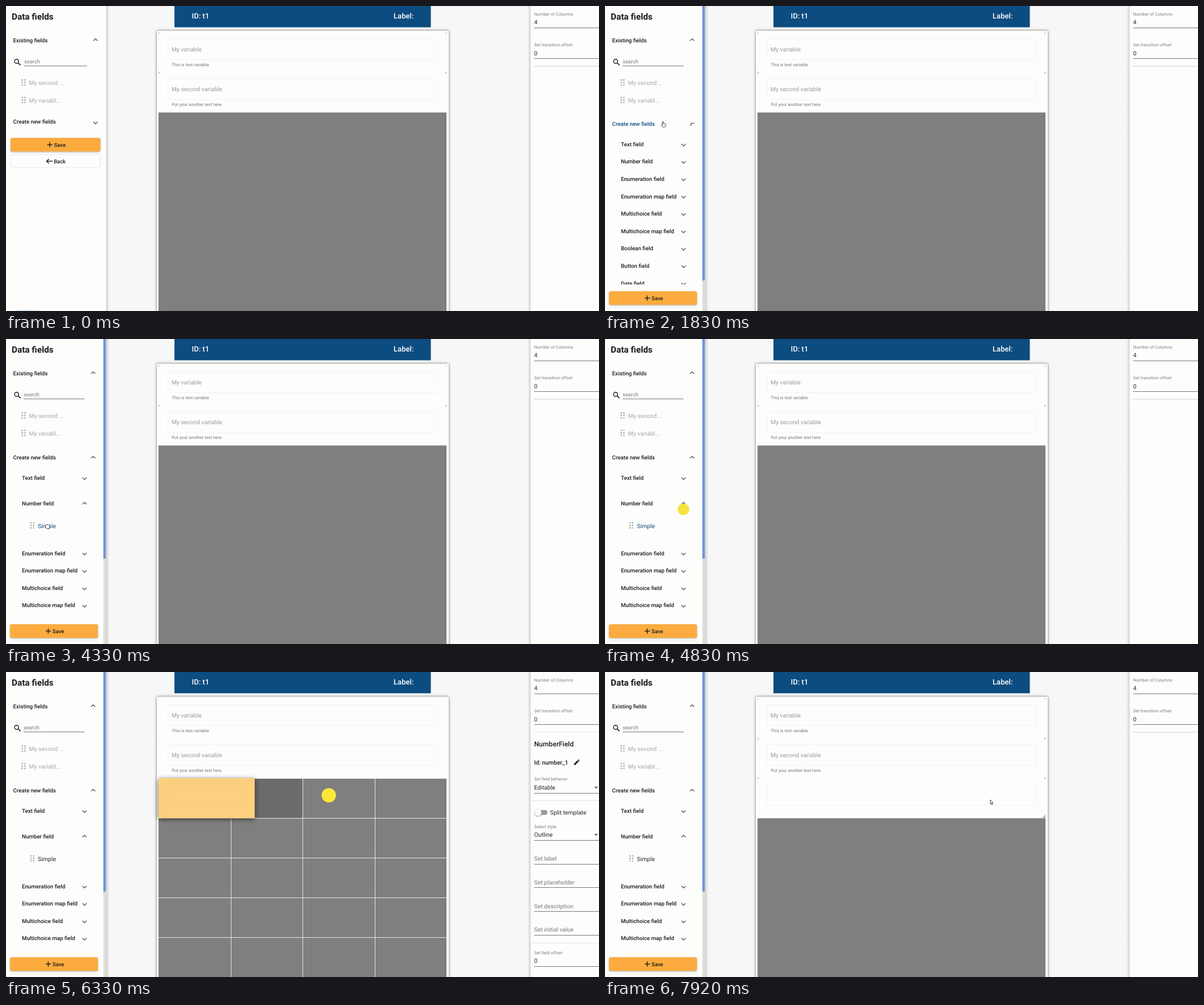
An HTML page with a canvas for the animation above (8 s loop, 1042x537 px).

```html
<!DOCTYPE html>
<html lang="en">
<head>
<meta charset="utf-8">
<title>Form builder</title>
<style>
html, body { margin: 0; width: 100%; height: 100%; overflow: hidden; background: #f7f7f8; }
canvas { display: block; width: 1042px; height: 537px; }
</style>
</head>
<body>
<canvas id="stage" width="1042" height="537"></canvas>
<script>
const ctx = document.getElementById('stage').getContext('2d');
ctx.textRendering = 'geometricPrecision';

const LOOP = 8000, STEP = 1000 / 12;
const INK = '#1c1c1c', BLUE = '#0d4c80', PAPER = '#fdfdfc', YELLOW = '#fde837', GREY = '#7f7f7f';
const GRID = { x: 268, y: 187.5, w: 126.5, h: 70, right: 774 };
const TYPES = ['Text', 'Number', 'Enumeration', 'Enumeration map', 'Multichoice',
  'Multichoice map', 'Boolean', 'Button', 'Date'];

// Moments of the story, in ms
const OPEN_LIST = 1704, OPEN_NUMBER = 3074, GRAB = 4660, DROP = 5325, RESIZE = 6160, RELEASE = 7325, DESELECT = 7490;

const POINTER = [
  [300, 95, 550], [1080, 104, 240], [1330, 103, 208], [2250, 103, 208], [2580, 78, 284],
  [3750, 78, 284], [4080, 100, 322], [4330, 73, 330], [4600, 73, 330], [5250, 327, 228],
  [5333, 337, 229], [5500, 374, 233], [5667, 395, 250], [5833, 395, 250], [5917, 395, 231],
  [6120, 395, 230], [6333, 567, 217], [6667, 722, 214], [6917, 762, 216], [7300, 762, 216],
  [7917, 678, 229]
];
const EDGE = [[6160, 395], [6333, 437], [6600, 600], [6833, 726], [6917, 748], [7000, 764]];

// Monotone cubic through the key points
function track(keys, t, k) {
  const last = keys.length - 1;
  if (t <= keys[0][0]) return keys[0][k];
  if (t >= keys[last][0]) return keys[last][k];
  let i = 0;
  while (t >= keys[i + 1][0]) i++;
  const slope = j => j < 0 || j >= last ? 0 : (keys[j + 1][k] - keys[j][k]) / (keys[j + 1][0] - keys[j][0]);
  const tangent = j => {
    const a = slope(j - 1), b = slope(j);
    return a * b <= 0 ? 0 : 2 * a * b / (a + b);
  };
  const d = keys[i + 1][0] - keys[i][0], s = (t - keys[i][0]) / d;
  const h = s * s * (3 - 2 * s);
  return keys[i][k] * (1 - h) + keys[i + 1][k] * h +
    d * s * (1 - s) * ((1 - s) * tangent(i) - s * tangent(i + 1));
}

// cubic-bezier(.4, 0, .2, 1)
function ease(x) {
  if (x <= 0) return 0;
  if (x >= 1) return 1;
  let lo = 0, hi = 1, s = 0.5;
  for (let i = 0; i < 20; i++) {
    s = (lo + hi) / 2;
    const v = 1.2 * s * (1 - s) ** 2 + 0.6 * s * s * (1 - s) + s ** 3;
    if (v < x) lo = s; else hi = s;
  }
  return s * s * (3 - 2 * s);
}

function rect(x, y, w, h, fill) {
  ctx.fillStyle = fill;
  ctx.fillRect(x, y, w, h);
}

function box(x, y, w, h, r, fill, stroke) {
  ctx.beginPath();
  ctx.roundRect(x, y, w, h, r);
  if (fill) { ctx.fillStyle = fill; ctx.fill(); }
  if (stroke) { ctx.strokeStyle = stroke; ctx.lineWidth = 1; ctx.stroke(); }
}

function withShadow(color, blur, dy, draw) {
  ctx.save();
  ctx.shadowColor = color;
  ctx.shadowBlur = blur;
  ctx.shadowOffsetY = dy;
  draw();
  ctx.restore();
}

function line(points, color, width) {
  ctx.beginPath();
  points.forEach(([x, y]) => ctx.lineTo(x, y));
  ctx.strokeStyle = color;
  ctx.lineWidth = width;
  ctx.stroke();
}

function disc(x, y, r, fill) {
  ctx.beginPath();
  ctx.arc(x, y, r, 0, 7);
  ctx.fillStyle = fill;
  ctx.fill();
}

// y is the middle of the capitals
function text(str, x, y, size, color = INK, weight = 400) {
  ctx.font = `${weight} ${size}px Roboto, sans-serif`;
  ctx.fillStyle = color;
  ctx.fillText(str, x, y + size * 0.36);
}

function fade(x0, x1, alpha) {
  const g = ctx.createLinearGradient(x0, 0, x1, 0);
  g.addColorStop(0, `rgba(0,0,0,${alpha})`);
  g.addColorStop(1, 'rgba(0,0,0,0)');
  rect(Math.min(x0, x1), 0, Math.abs(x1 - x0), 537, g);
}

function chevron(x, y, open) {
  ctx.save();
  ctx.translate(x, y);
  ctx.rotate(Math.PI * open);
  line([[-3.6, -0.8], [0, 2.8], [3.6, -0.8]], '#5a5a5a', 1.4);
  ctx.restore();
}

function handle(x, y) {
  for (let i = 0; i < 6; i++) disc(x + (i % 2) * 4.6, y + ((i >> 1) - 1) * 4.4, 1.35, '#a9a9a9');
}

function buttons(x, y, w, hover) {
  const mid = x + w / 2;
  withShadow('rgba(0,0,0,.3)', 3, 1, () => box(x, y, w, 24, 3, hover === 'save' ? '#f0a33b' : '#fcab3e'));
  line([[mid - 14.5, y + 12], [mid - 5.5, y + 12]], INK, 1.4);
  line([[mid - 10, y + 7.5], [mid - 10, y + 16.5]], INK, 1.4);
  text('Save', mid - 2.5, y + 12, 9.4, INK, 500);
  box(x, y + 29.5, w, 23, 3, hover === 'back' ? '#f3f3f3' : PAPER, '#e6e6e8');
  line([[mid - 15.5, y + 41], [mid - 5, y + 41]], INK, 1.4);
  line([[mid - 11.5, y + 37], [mid - 15.5, y + 41], [mid - 11.5, y + 45]], INK, 1.4);
  text('Back', mid - 3, y + 41, 9.4, INK, 500);
}

function sidebar(t, cx, cy) {
  const open = ease((t - OPEN_LIST) / 250), sub = ease((t - OPEN_NUMBER) / 250);
  const scroll = open > 0.7;
  const right = scroll ? 153.2 : 157.3;
  const near = y => t < GRAB && cx < 170 && Math.abs(cy - y) < 15;
  const tint = y => near(y) ? BLUE : INK;

  rect(0, 0, 176, 537, PAPER);
  fade(176, 182, 0.16);
  text('Data fields', 10, 18.5, 15.3, INK, 700);
  text('Existing fields', 12.6, 61, 9.7, INK, 500);
  chevron(right, 60.5, 1);

  ctx.beginPath();
  ctx.arc(18.6, 97.4, 3.6, 0, 7);
  ctx.strokeStyle = INK;
  ctx.lineWidth = 1.4;
  ctx.stroke();
  line([[21.2, 100], [25.4, 104.2]], INK, 1.7);
  text('search', scroll ? 31 : 32, 98, 9.2, '#7c7c7c');
  rect(scroll ? 31 : 32, 105, scroll ? 107 : 110.5, 1, '#777');

  handle(28.6, 134.6);
  text('My second ...', 40.6, 135.5, 10.35, '#a6a6a6');
  handle(28.6, 165.4);
  text('My variabl...', 40.6, 166.2, 10.35, '#a6a6a6');

  const head = 204 + 5 * open;
  text('Create new fields', 12.6, head, 9.7, tint(head), 500);
  chevron(right, head + 0.8 - 0.5 * open, open);

  const top = Math.min(502.3, 232.3 + 380 * open);
  if (open > 0) {
    ctx.save();
    ctx.beginPath();
    ctx.rect(0, head + 15, 170, top - 12 - head - 15);
    ctx.clip();
    TYPES.forEach((name, i) => {
      const y = head + 35.3 + 30.6 * i + sub * (i > 1 ? 71.7 : i * 15.1);
      text(name + ' field', 28, y, 9.7, tint(y), 500);
      chevron(138, y + 0.3, i === 1 ? sub : 0);
    });
    if (sub > 0) {
      const y = head + 65.9 + 15.1 * sub;
      ctx.beginPath();
      ctx.rect(0, y, 170, 10.5 + 56.6 * sub);
      ctx.clip();
      const sy = y + 34 + 5 * sub;
      const lit = near(sy) || (t >= GRAB && t < DROP);
      handle(43.9, sy - 0.8);
      text('Simple', 56, sy, 10.4, lit ? BLUE : '#2a2a2a');
    }
    ctx.restore();
  }

  let hover = '';
  if (t < 1400 && cx < 166) {
    if (cy > 232 && cy < 257) hover = 'save';
    if (cy > 261 && cy < 285) hover = 'back';
  }
  buttons(scroll ? 7 : 8, top, scroll ? 154.5 : 157.8, hover);

  if (scroll) {
    const content = 673.6 - 380 * (1 - open) + 71.7 * sub;
    rect(171, 0, 5, 537, '#dfdfda');
    box(171, -4, 4.5, 4 + 537 * 537 / content, 2, '#7195d6');
  }
  if (t < 75) box(18, 535.5, 41, 5, 3, '#cfe4ee');
}

function inputBox(y, right) {
  box(284.5, y + 0.5, right - 284.5, 37, 2, null, '#f1f2fa');
}

function marks(y) {
  line([[268.5, y - 1.5], [270, y], [268.5, y + 1.5]], '#777', 1);
  line([[774, y - 1.5], [772.5, y], [774, y + 1.5]], '#777', 1);
}

function grip(right) {
  ctx.beginPath();
  ctx.moveTo(right, 251);
  ctx.lineTo(right, 257.5);
  ctx.lineTo(right - 6.5, 257.5);
  ctx.fillStyle = '#b5b5b5';
  ctx.fill();
}

function form(t) {
  const { x, y, w, h, right } = GRID;
  const resizing = t >= RESIZE && t < RELEASE;

  rect(296, 0, 450.5, 37.5, BLUE);
  text('ID: t1', 326.5, 17, 13, '#fff', 500);
  text('Label:', 681, 17, 13.1, '#fff', 500);

  withShadow('rgba(0,0,0,.6)', 4, 0, () => box(265, 43.5, 513, 520, 2, PAPER));
  rect(x, y, right - x, 350, GREY);

  inputBox(57, 758);
  text('My variable', 291, 76, 10.4, '#9a9a9a');
  text('This is text variable', 291.3, 103.5, 7.65, '#777');
  inputBox(127, 758);
  text('My second variable', 291, 146, 10.35, '#9a9a9a');
  text('Put your another text here', 291.3, 173.5, 7.65, '#777');

  if (!resizing) {
    rect(268, 47, 2, 1, '#999');
    rect(772.5, 47, 2, 1, '#999');
    marks(117.3);
  } else {
    rect(268, 117, 2, 1, '#ccc');
    rect(772.5, 117, 2, 1, '#ccc');
  }

  if (t >= GRAB && t < DROP && track(POINTER, t, 1) > x) rect(x, y, w, h, '#6b6b6b');

  if (resizing) {
    const edge = track(EDGE, t, 1);
    rect(x, y, Math.ceil((edge - x) / w - 0.01) * w, h, '#6b6b6b');
    for (let i = 1; i < 4; i++) rect(Math.round(x + i * w), y, 1, 350, '#e8e8e8');
    for (let i = 0; i < 5; i++) rect(x, Math.floor(y + i * h), right - x, 1, '#e8e8e8');
    withShadow('rgba(0,0,0,.65)', 8, 1.5, () => rect(x, 187, edge - x, 70.5, '#fdcf7e'));
    box(284.5, 196.5, edge - 16 - 284.5, 38, 2, null, '#f4c981');
  } else if (t >= DROP) {
    const edge = t < RELEASE ? x + w : right;
    rect(x, 187, edge - x, 70.5, PAPER);
    inputBox(197, edge - 16);
    marks(187.3);
    grip(edge);
  }
}

function caret(y) {
  ctx.beginPath();
  ctx.moveTo(1033.5, y - 1.5);
  ctx.lineTo(1040.5, y - 1.5);
  ctx.lineTo(1037, y + 2);
  ctx.fillStyle = '#666';
  ctx.fill();
}

function setting(label, value, y) {
  text(label, 928, y, 7.7, '#808080');
  text(value, 928, y + 14.7, 10.4, '#262626');
  rect(928, Math.round(y + 24), 114, 1, '#777');
}

function panel(t) {
  fade(922, 916, 0.14);
  rect(922, 0, 120, 537, PAPER);
  setting('Number of Columns', '4', 14);
  setting('Set transition offset', '0', 68.4);
  const selected = t >= DROP && t < DESELECT;
  rect(928, 105.5, 114, 1, selected ? '#e4e4e4' : '#cfcfcf');
  if (!selected) return;

  text('NumberField', 928, 126.7, 12.1, INK, 500);
  text('Id: number_1', 928, 158.8, 10.3, INK, 500);
  line([[998.5, 163.3], [1005.2, 156.6]], INK, 3);
  line([[1005.8, 156], [1007, 154.8]], INK, 3);
  setting('Set field behavior', 'Editable', 188.7);
  caret(203.5);
  rect(922, 226, 120, 1, '#e0e2ee');
  box(933, 243, 18.5, 8.5, 4.2, '#9b9b9b');
  withShadow('rgba(0,0,0,.4)', 3, 1, () => disc(935, 247.2, 6, '#fafafa'));
  text('Split template', 956, 247.2, 10.35, '#262626');
  setting('Select style', 'Outline', 272);
  caret(286.5);
  ['label', 'placeholder', 'description', 'initial value'].forEach((name, i) => {
    const y = 328.6 + 41.7 * i;
    text('Set ' + name, 928, y, 10.35, '#777');
    rect(928, Math.floor(y + 9.4), 114, 1, '#777');
  });
  rect(922, 476.5, 120, 1, '#e6e6e0');
  setting('Set field offset', '0', 494);
}

function shape(x, y, points) {
  ctx.beginPath();
  points.forEach(([dx, dy]) => ctx.lineTo(x + dx, y + dy));
  ctx.closePath();
  ctx.fillStyle = '#fff';
  ctx.fill();
  ctx.strokeStyle = '#333';
  ctx.lineWidth = 0.9;
  ctx.lineJoin = 'round';
  ctx.stroke();
}

const HAND = [[-2, -4.6], [-0.8, -4.6], [-0.6, -1.2], [3, -0.6], [4, 0.4], [3.6, 3.2], [2.6, 5], [-1.6, 5],
  [-4, 1.4], [-3.6, 0.6], [-2, 1.6]];
const FIST = [[-3, -2.4], [-1, -3.2], [1.4, -3], [3.4, -1.8], [3.6, 1], [2.4, 4], [-1.4, 4], [-3.8, 1]];
const ARROW = [[-1, -4], [-1, 3.4], [0.6, 2], [1.7, 4.6], [2.8, 4.1], [1.8, 1.6], [3.8, 1.4]];

function doubleArrow(x, y, angle) {
  ctx.save();
  ctx.translate(x, y);
  ctx.rotate(angle);
  shape(0, 0, [[-6, 0], [-3, -3], [-3, -1], [3, -1], [3, -3], [6, 0], [3, 3], [3, 1], [-3, 1], [-3, 3]]);
  ctx.restore();
}

function pulse(t, start, x, y) {
  const age = t - start;
  if (age < 0 || age > 200) return;
  ctx.globalAlpha = 1 - age / 1200;
  disc(x, y, 12.5 * (1 - age / 420), YELLOW);
  ctx.globalAlpha = 1;
}

function pointer(t, x, y) {
  if (t < 320) return;
  if (t >= GRAB && t < DROP) return disc(x, y, 10.2, '#f6e23c');
  if (t >= RESIZE && t < RELEASE) return disc(x, y, 12.6, YELLOW);
  pulse(t, 1575, x, y);
  pulse(t, 2995, x, y - 2);
  if (t > 4250 && t < GRAB) shape(x, y, FIST);
  else if (t < GRAB) shape(x, y, HAND);
  else if (t > 5600 && t < 5900) doubleArrow(x, y, Math.PI / 4);
  else if (t >= 5900 && t < RESIZE) doubleArrow(x, y, 0);
  else shape(x, y, ARROW);
}

function draw(t) {
  const x = track(POINTER, t, 1), y = track(POINTER, t, 2);
  rect(0, 0, 1042, 537, '#f7f7f8');
  form(t);
  sidebar(t, x, y);
  panel(t);
  pointer(t, x, y);
}

let origin = null;
function frame(now) {
  if (origin === null) origin = now;
  const t = (now - origin) % LOOP;
  draw(Math.floor((t + 5) / STEP) * STEP % LOOP);
  requestAnimationFrame(frame);
}
requestAnimationFrame(frame);
</script>
</body>
</html>
```
